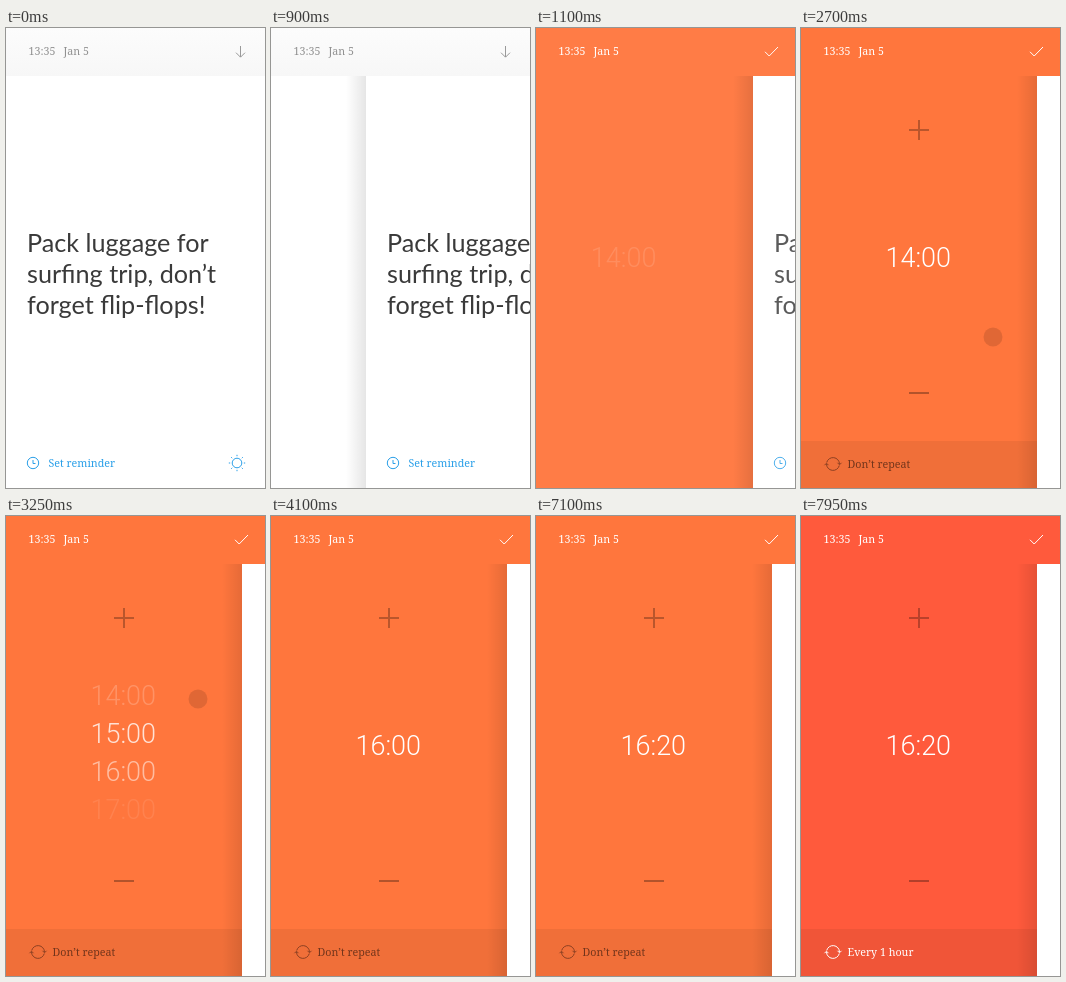
An HTML page for the animation above (8000 ms loop, 259x460 px).

```html
<!DOCTYPE html>
<html lang="en">
<head>
<meta charset="utf-8">
<title>Reminder</title>
<style>
html, body { margin: 0; height: 100%; overflow: hidden; background: #fff; }
svg { display: block; width: 100vw; height: 100vh; }
text { font: 300 10.7px "Noto Serif", serif; white-space: pre; }
.big { font: 25.2px Lato, sans-serif; fill: #3a3a3a; }
#time text { font: 300 27px Roboto, sans-serif; fill: #fff; }
.line { fill: none; stroke-width: 1; }
.step { stroke: #000; stroke-width: 2; }
</style>
</head>
<body>
<svg viewBox="0 0 259 460">
  <defs>
    <linearGradient id="headFill" x2="0" y2="1">
      <stop stop-color="#fcfcfc"/><stop offset="1" stop-color="#f7f7f7"/>
    </linearGradient>
    <linearGradient id="shade">
      <stop stop-opacity="0"/><stop offset="1" stop-opacity=".1"/>
    </linearGradient>
  </defs>
  <rect width="259" height="460" fill="#fff"/>
  <rect width="259" height="48" fill="url(#headFill)"/>
  <rect id="back" width="259" height="460"/>

  <g id="panel">
    <rect y="413" width="259" height="47" fill-opacity=".06"/>
    <path id="plus" class="step" d="M108 102h20M118 92v20"/>
    <path class="step" d="M108 365h20" stroke-opacity=".3"/>
    <g id="repeat" class="line">
      <path d="M25.7 434.5A6.5 6.5 0 0 1 38.5 436M38.3 437.5A6.5 6.5 0 0 1 25.5 436"/>
      <path d="M36.5 434.8l2 2 2-2M23.5 437.2l2-2 2 2"/>
    </g>
    <text id="once" x="46.5" y="440">Don’t repeat</text>
    <text id="hourly" x="46.5" y="440" fill="#fff">Every 1 hour</text>
  </g>
  <g id="time"></g>
  <circle id="touch" fill-opacity=".12"/>

  <g id="card">
    <rect x="-20" y="48" width="20" height="412" fill="url(#shade)"/>
    <rect y="48" width="259" height="412" fill="#fff"/>
    <g id="note">
      <text class="big" x="21" y="224">Pack luggage for</text>
      <text class="big" x="21" y="255">surfing trip, don’t</text>
      <text class="big" x="21" y="286">forget flip-flops!</text>
      <g class="line" stroke="#2a9fe8">
        <circle cx="27" cy="435" r="5.7"/>
        <path d="M27 432v3.5h2.5"/>
        <circle cx="231" cy="435" r="4.8"/>
        <path id="rays"/>
      </g>
      <text x="42.5" y="439" fill="#2a9fe8">Set reminder</text>
    </g>
  </g>

  <g id="head">
    <text x="22.5" y="27">13:35</text>
    <text x="57.5" y="27">Jan 5</text>
  </g>
  <path id="arrow" class="line" stroke="#999" d="M234.5 18v11M230 24.7l4.5 4.5 4.5-4.5"/>
  <path id="check" class="line" stroke="#fff" d="M229 23.8l4.2 4.2 8.8-9"/>
</svg>
<script>
const $ = id => document.getElementById(id);
const set = (el, attrs) => { for (const k in attrs) el.setAttribute(k, attrs[k]); };
const clamp = v => Math.min(1, Math.max(0, v));
const ramp = (t, a, b) => clamp((t - a) / (b - a));
const out = p => 1 - (1 - p) ** 2;
const smooth = p => p * p * (3 - 2 * p);
const mix = (a, b, p) => a + (b - a) * p;
const rgb = (a, b, p) => `rgb(${a.map((v, i) => Math.round(mix(v, b[i], p)))})`;

const LEFT = 84.5, BASE = 239, ROW = 38;
const ORANGE = [255, 118, 61], RED = [255, 90, 60];
const GREY = [145, 145, 145], WHITE = [255, 255, 255];

function timeText(str, x) {
  const el = document.createElementNS('http://www.w3.org/2000/svg', 'text');
  el.textContent = str;
  set(el, { x, y: BASE });
  return $('time').appendChild(el);
}
const hours = [13, 14, 15, 16, 17].map(h => timeText(h + ':', LEFT));
const minuteX = LEFT + hours[3].getComputedTextLength();
const minutes = ['00', '10', '20'].map(m => timeText(m, minuteX));

let rays = '';
for (let i = 0; i < 8; i++) {
  const c = Math.cos(i * Math.PI / 4), s = Math.sin(i * Math.PI / 4);
  rays += `M${231 + 6.8 * c} ${435 + 6.8 * s}L${231 + 8.2 * c} ${435 + 8.2 * s}`;
}
set($('rays'), { d: rays });

// Accelerates to 57% of the way, then eases out
const slide = t => t < 950
  ? .57 * ramp(t, 500, 950) ** 3
  : 1 - .43 * (1 - ramp(t, 950, 1300)) ** 3;

// Start, end, x, y
const taps = [[5100, 5450, 152, 98], [5850, 6150, 152, 98], [7100, 7450, 130, 440]];

function drawTouch(t) {
  let cx = 192, cy = mix(309, 150, smooth(ramp(t, 2700, 3480))), r = 9.5;
  let opacity = t < 2700 ? 0 : 1 - ramp(t, 3450, 3620);
  for (const [a, b, x, y] of taps) {
    if (t <= a || t >= b) continue;
    const p = ramp(t, a, b);
    [cx, cy, r, opacity] = [x, y, mix(12, 9.5, out(p)), Math.sin(Math.PI * p)];
  }
  set($('touch'), { cx, cy, r, opacity });
}

function drawTime(t) {
  const x = -39 * (1 - out(ramp(t, 1050, 1450)));
  set($('time'), { transform: `translate(${x} 0)`, opacity: ramp(t, 1050, 1450) });

  const pos = 1 + 2 * smooth(ramp(t, 2720, 3600));
  const near = ramp(t, 2700, 2900) * (1 - ramp(t, 3900, 4100));
  hours.forEach((el, i) => {
    const d = Math.abs(i - pos);
    el.textContent = 13 + i + (t < 5100 ? ':00' : ':');
    set(el, {
      y: BASE + ROW * (i - pos),
      opacity: clamp(1 - d) + .3 * near * clamp(1 - Math.abs(1 - d))
    });
  });

  const step = smooth(ramp(t, 5250, 5550)) + smooth(ramp(t, 5920, 6180));
  minutes.forEach((el, i) => set(el, {
    y: BASE + 12 * (i - step),
    opacity: t < 5100 ? 0 : clamp(1 - Math.abs(i - step))
  }));
}

function draw(t) {
  const x = Math.floor(236 * slide(t));
  const tint = clamp((x - 118) / 104);
  set($('back'), { fill: rgb(ORANGE, RED, ramp(t, 7100, 7900)), opacity: tint });
  set($('card'), { transform: `translate(${x} 0)` });
  set($('note'), { opacity: 1 - ramp(t, 1000, 1600) });
  set($('head'), { fill: rgb(GREY, WHITE, clamp(tint * 1.6)) });
  set($('arrow'), { opacity: 1 - clamp(tint * 2) });
  set($('check'), { opacity: tint });

  set($('panel'), { opacity: ramp(t, 1350, 1850) });
  const press = taps.slice(0, 2).reduce((s, [a, b]) => s + Math.sin(Math.PI * ramp(t, a, b)), 0);
  set($('plus'), { 'stroke-opacity': .27 + .2 * press });

  const on = ramp(t, 7250, 7750);
  set($('repeat'), {
    stroke: rgb([140, 64, 34], WHITE, on),
    transform: `rotate(${180 * smooth(ramp(t, 7150, 7950))} 32 436)`
  });
  set($('once'), { opacity: .52 * (1 - on) });
  set($('hourly'), { opacity: on });

  drawTime(t);
  drawTouch(t);
}

const start = performance.now();
function frame() {
  draw((performance.now() - start) % 8000);
  requestAnimationFrame(frame);
}
frame();
</script>
</body>
</html>
```
